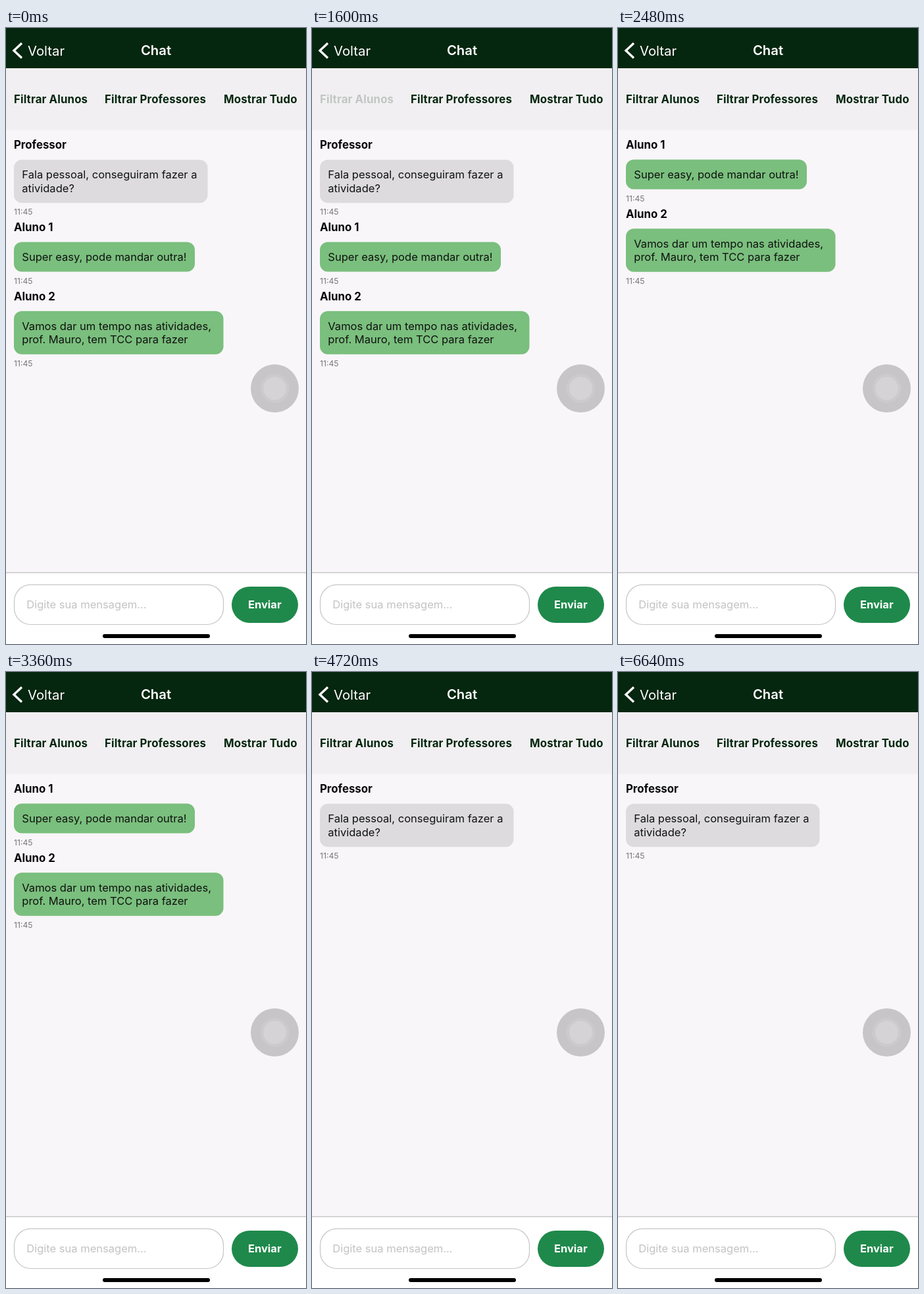
Animation, 456 px wide and 934 px high, one loop 6.72 s. Source, as an HTML page:

```html
<!DOCTYPE html>
<html lang="pt-BR">
<head>
<meta charset="utf-8">
<title>Chat</title>
<style>
  html, body { margin: 0; width: 100%; height: 100%; overflow: hidden; background: #f8f6f9; }
  svg { display: block; width: 456px; height: 934px; }
  text { font-family: Inter, "Liberation Sans", sans-serif; font-size: 16.52px; fill: #101211; }
  .bold { font-size: 16.8px; font-weight: 700; }
  .name { fill: #050505; }
  .filter { fill: #05260f; letter-spacing: .14px; }
  .time { font-size: 12.2px; fill: #77767a; }
  .bar { font-size: 20.3px; fill: #fff; }
  .title { font-weight: 600; }
  .hint { fill: #c3c3c5; }
  .send { font-size: 16.5px; fill: #fff; }
  .mid { text-anchor: middle; }
  .green { fill: #7abf7d; }
  .grey { fill: #dddbde; }

  .tap, .teacher, .students { animation: 6720ms infinite; }
  .tap { animation-timing-function: ease-in-out; }
  .tap-students { animation-name: tap-students; }
  .tap-teachers { animation-name: tap-teachers; }
  .teacher { animation-name: teacher; animation-timing-function: step-end; }
  .students { animation-name: students; animation-timing-function: step-end; }

  /* press at 1460 ms, release at 1720 ms */
  @keyframes tap-students {
    0%, 21.73%  { opacity: 1; }
    23.66%, 25.6% { opacity: .2; }
    29.32%, 100% { opacity: 1; }
  }
  /* press at 4180 ms, release at 4400 ms */
  @keyframes tap-teachers {
    0%, 62.2%   { opacity: 1; }
    64.14%, 65.48% { opacity: .2; }
    69.2%, 100% { opacity: 1; }
  }
  @keyframes teacher {
    0%     { visibility: visible; }
    25.6%  { visibility: hidden; }
    65.48%, 100% { visibility: visible; }
  }
  @keyframes students {
    0%     { visibility: visible; transform: translateY(0); }
    25.6%  { visibility: visible; transform: translateY(-125px); }
    65.48%, 100% { visibility: hidden; transform: translateY(-125px); }
  }
</style>
</head>
<body>
<svg viewBox="0 0 456 934">
  <rect width="456" height="934" fill="#f8f6f9"/>

  <rect y="61" width="456" height="93.5" fill="#f1eff1"/>
  <rect width="456" height="61" fill="#05260f"/>
  <path d="M24 23 L12 34.2 L24 45.4" fill="none" stroke="#fff" stroke-width="3.4"/>
  <text class="bar" x="33" y="41.6">Voltar</text>
  <text class="bar title mid" x="228" y="41.4">Chat</text>

  <text class="bold filter tap tap-students" x="12" y="113.6">Filtrar Alunos</text>
  <text class="bold filter tap tap-teachers" x="150" y="113.6">Filtrar Professores</text>
  <text class="bold filter" x="331" y="113.6">Mostrar Tudo</text>

  <g class="teacher">
    <text class="bold name" x="12" y="183">Professor</text>
    <rect class="grey" x="12" y="199.7" width="294.5" height="65.5" rx="12"/>
    <text x="24.3" y="228.2">Fala pessoal, conseguiram fazer a</text>
    <text x="24.3" y="248.6">atividade?</text>
    <text class="time" x="12" y="283.2">11:45</text>
  </g>

  <g class="students">
    <text class="bold name" x="12" y="308">Aluno 1</text>
    <rect class="green" x="12" y="324.6" width="275" height="45" rx="12"/>
    <text x="24.3" y="353.1">Super easy, pode mandar outra!</text>
    <text class="time" x="12" y="387.9">11:45</text>

    <text class="bold name" x="12" y="412.8">Aluno 2</text>
    <rect class="green" x="12" y="429.3" width="318.5" height="65.5" rx="12"/>
    <text x="24.3" y="457.9">Vamos dar um tempo nas atividades,</text>
    <text x="24.3" y="478.4">prof. Mauro, tem TCC para fazer</text>
    <text class="time" x="12" y="512.8">11:45</text>
  </g>

  <circle cx="408.5" cy="546.5" r="36.5" fill="#c7c5c8"/>
  <circle cx="408.5" cy="546.5" r="22" fill="#cccacd"/>
  <circle cx="408.5" cy="546.5" r="17.5" fill="#d5d3d6"/>

  <rect y="826" width="456" height="108" fill="#fff"/>
  <rect y="825" width="456" height="1.5" fill="#c9c8cb"/>
  <rect x="12.5" y="844.2" width="318" height="60.3" rx="25" fill="#fff" stroke="#c5c5c6" stroke-width="1.2"/>
  <text class="hint" x="31.3" y="880.4">Digite sua mensagem...</text>
  <rect x="343" y="847" width="101" height="55" rx="27.5" fill="#1f894b"/>
  <text class="bold send mid" x="393.3" y="880.3">Enviar</text>
  <rect x="147" y="919" width="163" height="6" rx="3"/>
</svg>
</body>
</html>
```
